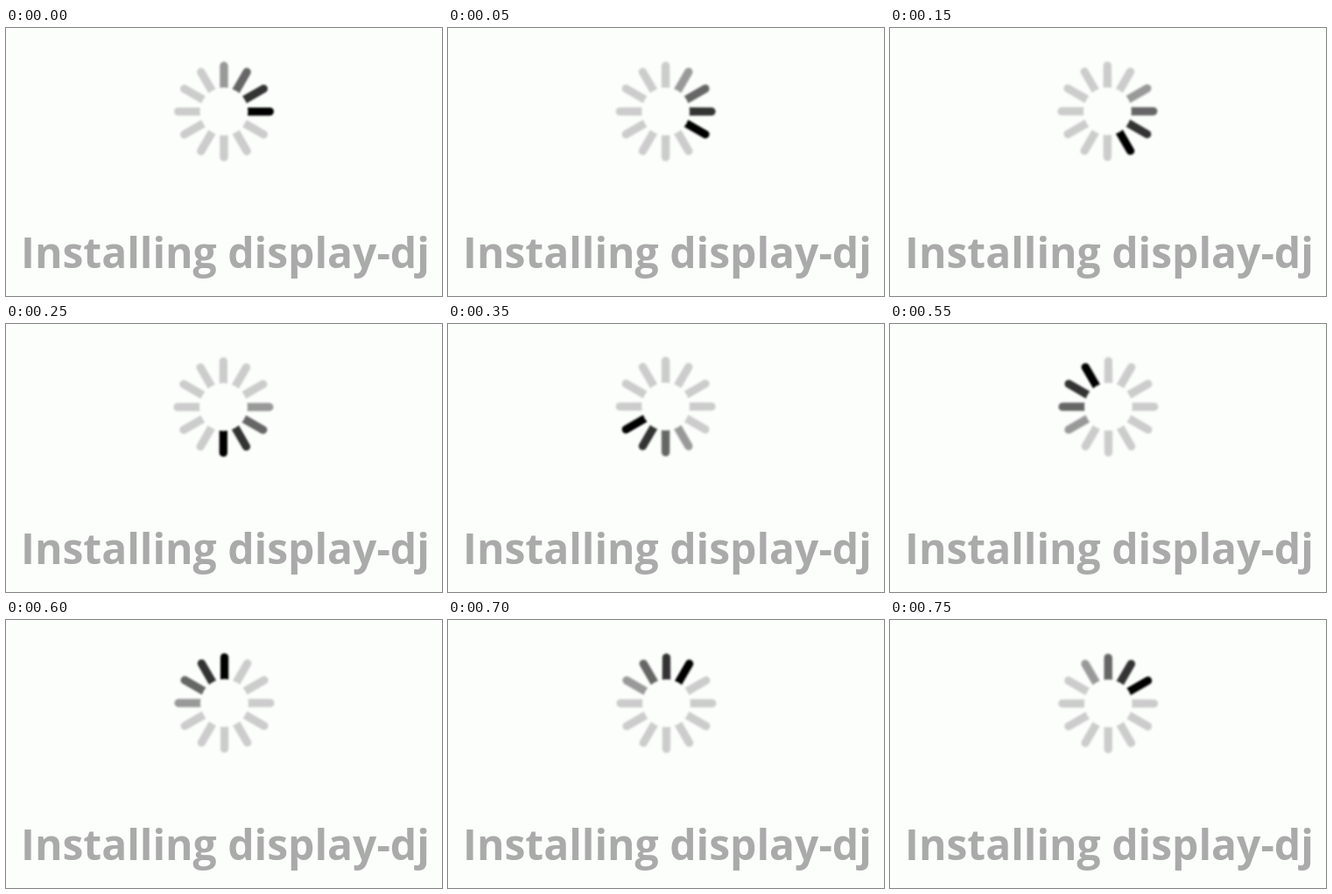
Write an HTML page that moves like this. It is 498 by 307 pixels and loops after 800 ms.

```html
<!DOCTYPE html>
<html lang="en">
<head>
<meta charset="utf-8">
<title>Installing</title>
<style>
  :root { --paper: #fcfefc; }
  html, body { margin: 0; width: 100%; height: 100%; overflow: hidden; background: var(--paper); }
  svg { display: block; }
  text { font: 700 48px "Open Sans", sans-serif; fill: #aaa; }
  .wheel { animation: turn 800ms step-end infinite; filter: blur(.9px); }
  .spoke { stroke-width: 9.4; stroke-linecap: round; }
  .hub { fill: var(--paper); }

  /* one spoke per step, with uneven holds */
  @keyframes turn {
    0%     { transform: rotate(0deg); }
    6.25%  { transform: rotate(30deg); }
    18.75% { transform: rotate(60deg); }
    31.25% { transform: rotate(90deg); }
    37.5%  { transform: rotate(120deg); }
    43.75% { transform: rotate(150deg); }
    56.25% { transform: rotate(180deg); }
    62.5%  { transform: rotate(210deg); }
    68.75% { transform: rotate(240deg); }
    75%    { transform: rotate(270deg); }
    87.5%  { transform: rotate(300deg); }
    93.75% { transform: rotate(330deg); }
    100%   { transform: rotate(360deg); }
  }
</style>
</head>
<body>
<svg width="498" height="307" viewBox="0 0 498 307">
  <g transform="translate(248.9 95.1)">
    <g class="wheel">
      <!-- the wheel sits slightly off its pivot -->
      <g id="spokes" transform="translate(0 .6)"></g>
    </g>
  </g>
  <text x="17" y="275.4">Installing display-dj</text>
</svg>
<script>
  const NS = "http://www.w3.org/2000/svg";
  const spokes = document.getElementById("spokes");
  const tail = ["#000", "#333", "#666", "#999"];

  function add(tag, attrs) {
    const el = document.createElementNS(NS, tag);
    for (const key in attrs) el.setAttribute(key, attrs[key]);
    spokes.append(el);
  }

  for (let i = 11; i >= 0; i--) {
    add("line", {
      class: "spoke", x1: 24, x2: 52.3,
      stroke: tail[i] || "#ccc",
      transform: `rotate(${-30 * i})`
    });
  }
  add("circle", { class: "hub", r: 27.5 });
</script>
</body>
</html>
```
